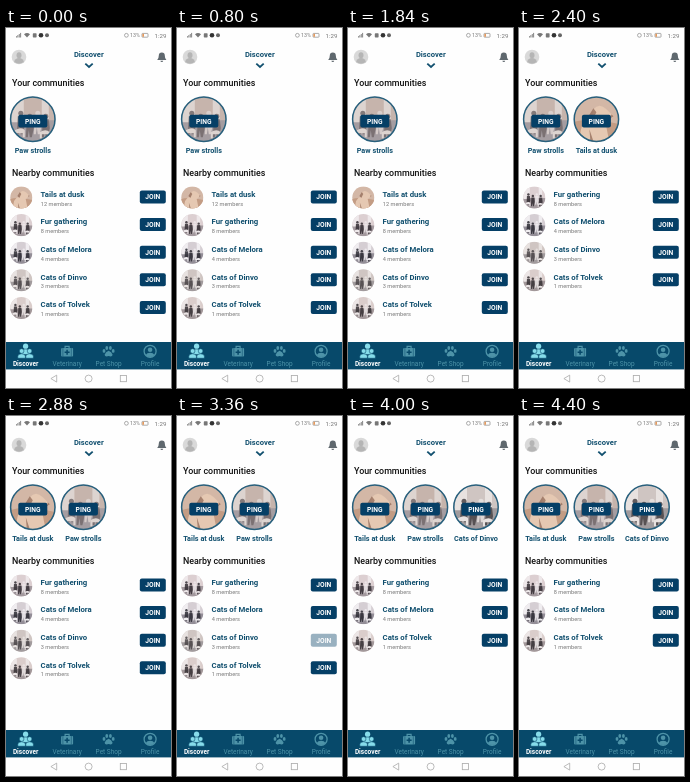
An HTML page for the animation above (4.64 s loop, 165x360 px).

```html
<!DOCTYPE html>
<html lang="en">
<head>
<meta charset="utf-8">
<title>Communities</title>
<style>
  html, body { margin: 0; width: 100%; height: 100%; overflow: hidden; background: #fefefe; }
  svg { display: block; width: 165px; height: 360px; font-family: Roboto, sans-serif; }
  .title { font-size: 8.9px; font-weight: 500; fill: #111; }
  .name { font-size: 7.75px; font-weight: 700; fill: #12506f; }
  .label { font-size: 7.3px; font-weight: 700; fill: #12506f; text-anchor: middle; }
  .sub { font-size: 5.6px; fill: #777; }
  .btn { font-size: 6.7px; font-weight: 700; fill: #fff; text-anchor: middle; }
  .tab { font-size: 6.5px; text-anchor: middle; }
  .status { fill: #777; }
  .thin { fill: none; stroke: #888; stroke-width: .7; }
  .line { fill: none; stroke: #aaa; stroke-width: .8; }
</style>
</head>
<body>
<svg viewBox="0 0 165 360" xmlns="http://www.w3.org/2000/svg">
  <defs><clipPath id="disc"><circle r="22.5"/></clipPath></defs>
  <rect width="165" height="360" fill="#fefefe"/>
  <g id="bar"></g>

  <circle cx="13" cy="29" r="7.3" fill="#d9d9d9"/>
  <ellipse cx="13" cy="27.2" rx="2.5" ry="3" fill="#b5b5b5"/>
  <path d="M8.2 34a4.8 4 0 0 1 9.6 0Q13 37.6 8.2 34Z" fill="#b5b5b5"/>
  <text class="label" x="82.8" y="29.3" style="font-size:7.6px">Discover</text>
  <path d="M79.3 35.6l3.7 3.4 3.7-3.4" fill="none" stroke="#12506f" stroke-width="1.8"/>
  <path d="M151.2 32q1.6-1.2 1.6-4.4a3 3.2 0 0 1 6 0q0 3.2 1.6 4.4Z" fill="#5f686e"/>
  <path d="M154.4 32.7a1.4 1.3 0 0 0 2.8 0Z" fill="#5f686e"/>

  <text class="title" x="6" y="57.6">Your communities</text>
  <g id="joined"></g>
  <text class="title" x="6" y="148">Nearby communities</text>
  <g id="nearby"></g>

  <rect y="314" width="165" height="27.4" fill="#07496a"/>
  <g id="tabs"></g>
  <path class="line" d="M50.7 347.1v7l-5.8-3.5Z"/>
  <circle class="line" cx="82.6" cy="350.6" r="3.5"/>
  <rect class="line" x="114.3" y="347.5" width="6.2" height="6.2"/>
</svg>
<script>
const LOOP = 4640, STEP = 80, PITCH = 27.6;
const NAVY = '#053f66', BAR = '#07496a', TEAL = '#4d93a8', CYAN = '#86dcea';
const $ = id => document.getElementById(id);

const groups = {
  walk:   { name: 'Paw strolls', count: 3, tones: ['#c6b4ac', '#a59da1', '#ddd4d0', '#746a6c'] },
  life:   { name: 'Tails at dusk', count: 12, tones: ['#d3b7a6', '#c39c84', '#e5c8b2', '#8d6653'] },
  meet:   { name: 'Fur gathering', count: 8, tones: ['#dccfd1', '#a3999e', '#eee8ea', '#332c32'] },
  melora: { name: 'Cats of Melora', count: 4, tones: ['#d5ced3', '#938e97', '#f0edf0', '#2b2a32'] },
  dinvo:  { name: 'Cats of Dinvo', count: 3, tones: ['#cfc5c2', '#a19b9d', '#e8e2e0', '#4a4547'] },
  tolvek: { name: 'Cats of Tolvek', count: 1, tones: ['#dacdcb', '#a2989a', '#ece6e6', '#362f33'] }
};

const states = [
  { at: 0,    joined: ['walk'], nearby: ['life', 'meet', 'melora', 'dinvo', 'tolvek'] },
  { at: 2320, joined: ['walk', 'life'], nearby: ['meet', 'melora', 'dinvo', 'tolvek'] },
  { at: 2720, joined: ['life', 'walk'], nearby: ['meet', 'melora', 'dinvo', 'tolvek'] },
  { at: 3840, joined: ['life', 'walk', 'dinvo'], nearby: ['meet', 'melora', 'tolvek'] }
];
const presses = [{ id: 'life', at: 1840 }, { id: 'dinvo', at: 3240 }];

// Simplified scenes: one animal close up, or a small group on a path.
function photo(id) {
  const [sky, ground, light, dark] = groups[id].tones;
  const shapes = id === 'life'
    ? `<path d="M-23 3Q-8-2 23 5V23H-23Z" fill="${ground}"/>
       <path d="M-16 23Q-18 2-4-2L-3-10Q3-17 10-10L16-4 12 1 9 3 13 23Z" fill="${light}"/>
       <path d="M-3-11l-5 8 4 4 4-8ZM-7 10l4 12h-3ZM15-5l2 2-3 2Z" fill="${dark}" opacity=".7"/>`
    : `<path d="M-23 1H23V23H-23Z" fill="${ground}"/>
       <path d="M-23-23h14v26h-14ZM9-23h7V2H9Z" fill="${light}"/>` +
      [-12, -3, 5, 13].map((x, i) =>
        `<g transform="translate(${x} ${i % 2 * 3 - 6})" fill="${i === 2 ? light : dark}" opacity=".85">
           <circle r="2.5"/><path d="M-3 3H3L4 12 2 21H0L-1 14-2 21H-4Z"/></g>`).join('') +
      `<path d="M-18 11q7-4 10 0v7h-2v-4h-6v4h-2ZM7 13q6-4 10 0v6h-2v-4H9v4H7Z" fill="${light}"/>`;
  return `<g clip-path="url(#disc)"><rect x="-23" y="-23" width="46" height="46" fill="${sky}"/>${shapes}</g>`;
}

const button = (text, w, h) =>
  `<rect x="${-w / 2}" y="${-h / 2}" width="${w}" height="${h}" rx="2" fill="${NAVY}"/>
   <text class="btn" y="2.4">${text}</text>`;

const badge = (id, i) => `<g transform="translate(${26.8 + i * 50.6} 91.2)">
  ${photo(id)}<circle r="22.2" fill="none" stroke="#28607d" stroke-width="1.5"/>
  <g transform="translate(0 1.9)">${button('PING', 29, 12.8)}</g>
  <text class="label" y="33.6">${groups[id].name}</text></g>`;

const row = (id, i) => `<g transform="translate(0 ${169 + i * PITCH})">
  <g transform="translate(15.3 .5) scale(.49)">${photo(id)}</g>
  <text class="name" x="34.6" y="-.2">${groups[id].name}</text>
  <text class="sub" x="34.8" y="8.7">${groups[id].count} members</text>
  <g id="join-${id}" transform="translate(146.8 0)">${button('JOIN', 26, 13)}</g></g>`;

function drawChrome() {
  $('bar').innerHTML = `<g class="status">
    ${[0, 1, 2, 3].map(i => `<rect x="${10 + i * 1.4}" y="${8.2 - i * 1.1}" width=".9" height="${1.3 + i * 1.1}"/>`).join('')}
    <path d="M18 6.2q3-2.4 6 0l-3 3.3Z"/>
    <rect x="26.8" y="5.3" width="3.8" height="4.2" rx=".7"/>
    <circle cx="35" cy="7.3" r="2.3" fill="#333"/>
    <circle cx="41" cy="7.3" r="2" fill="#666"/>
    <circle class="thin" cx="120.4" cy="7.3" r="1.9"/>
    <text x="124" y="9.3" font-size="5.3">13%</text>
    <rect class="thin" x="136" y="5.4" width="6" height="3.8" rx=".6"/>
    <rect x="136.4" y="5.8" width="1.6" height="3" fill="#e79a5c"/>
    <text x="148.6" y="9.5" font-size="6.2">1:29</text></g>`;

  const person = (x, y, s) => `<g transform="translate(${x} ${y}) scale(${s})">
    <circle cy="-2.6" r="2.5"/><path d="M-4 5V3Q-4 .3 0 .3T4 3V5Z"/></g>`;
  const icons = [
    person(0, -2.4, 1.05) + `<g stroke="${BAR}" stroke-width=".6">${person(-4, 2.2, .95)}${person(4, 2.2, .95)}</g>`,
    `<path d="M-2-3V-5H2V-3" fill="none" stroke="${TEAL}" stroke-width="1.2"/>
     <rect x="-6" y="-3.3" width="12" height="8.6" rx="1"/>
     <path d="M0-1.5V3.5M-2.5 1H2.5" stroke="${BAR}" stroke-width="1.5"/>
     <path d="M-4.2-3.3V5.3M4.2-3.3V5.3" stroke="${BAR}" stroke-width=".5"/>`,
    `<path d="M0-.5Q3 .5 4 3.5 3.6 6 0 4.7-3.6 6-4 3.5-3 .5 0-.5Z"/>
     <ellipse cx="-4.6" cy="-.4" rx="1.4" ry="1.9"/><ellipse cx="4.6" cy="-.4" rx="1.4" ry="1.9"/>
     <ellipse cx="-1.8" cy="-3.4" rx="1.4" ry="2"/><ellipse cx="1.8" cy="-3.4" rx="1.4" ry="2"/>`,
    `<circle r="6" fill="none" stroke="${TEAL}" stroke-width="1.3"/><circle cy="-1.6" r="2.3"/>
     <path d="M-4.4 3.6Q-3.2 1.5 0 1.5T4.4 3.6Q0 8 -4.4 3.6Z"/>`
  ];
  const names = ['Discover', 'Veterinary', 'Pet Shop', 'Profile'];
  $('tabs').innerHTML = names.map((name, i) => `<g transform="translate(${19.6 + i * 41.5} 323.3)">
    <g fill="${i ? TEAL : CYAN}">${icons[i]}</g>
    <text class="tab" y="14.6" fill="${i ? TEAL : '#fff'}" font-weight="${i ? 400 : 700}">${name}</text></g>`).join('');
}

// Touch feedback: quick dim, short hold, slower recovery.
function pressOpacity(t) {
  if (t < 0 || t > 440) return 1;
  if (t < 120) return 1 - .6 * t / 120;
  if (t < 200) return .4;
  return .4 + .6 * (t - 200) / 240;
}

let shown;
function render(t) {
  const state = states.filter(s => s.at <= t).pop();
  if (state !== shown) {
    $('joined').innerHTML = state.joined.map(badge).join('');
    $('nearby').innerHTML = state.nearby.map(row).join('');
    shown = state;
  }
  for (const { id, at } of presses) {
    const join = $('join-' + id);
    if (join) join.setAttribute('opacity', pressOpacity(t - at));
  }
}

drawChrome();
render(0);
const start = performance.now();
function tick() {
  const t = (performance.now() - start) % LOOP;
  render(Math.floor(t / STEP) * STEP);
  requestAnimationFrame(tick);
}
requestAnimationFrame(tick);
</script>
</body>
</html>
```
